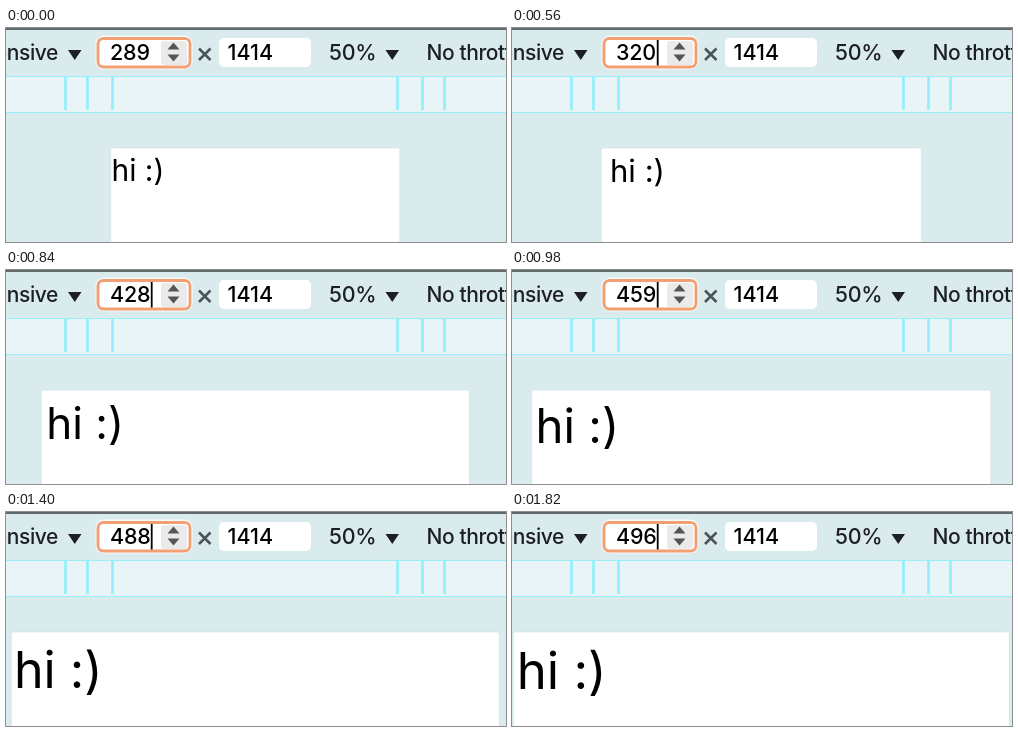
Recreate the animation shown at these times as an HTML page. Size 500 by 214 pixels, loop 1960 ms.

```html
<!DOCTYPE html>
<html lang="en">
<head>
<meta charset="utf-8">
<title>Responsive width</title>
<style>
  html, body { margin: 0; width: 100%; height: 100%; overflow: hidden; background: #daebee; }
  svg { display: block; width: 100vw; height: 100vh; }
  text { font-family: Inter, Roboto, sans-serif; white-space: pre; }
  .ui { font-size: 21.5px; font-weight: 500; fill: #1d2022; }
  .word { font-size: 21px; letter-spacing: -.4px; }
  .number { fill: #000; }
  .field { fill: #fff; }
</style>
</head>
<body>
<svg viewBox="0 0 500 214">
  <rect width="500" height="214" fill="#daebee"/>
  <rect width="500" height="2" fill="#62696c"/>
  <rect y="48" width="500" height="37" fill="#e9f4f7"/>
  <path d="M0 48.5H500M0 84.5H500" stroke="#98effb"/>
  <path id="ticks" stroke="#92effc" stroke-width="2.7"/>

  <g class="ui">
    <text class="word" x="52" y="32" text-anchor="end">responsive</text>
    <text x="323" y="32" letter-spacing="-.3">50%</text>
    <text class="word" x="420.5" y="32">No throttling</text>
  </g>
  <path d="M62 22H75.5L68.75 32ZM379.5 22H393L386.25 32Z" fill="#1d2022"/>
  <path d="M193 20.5L204.5 32M204.5 20.5L193 32" stroke="#4b5357" stroke-width="2.5"/>

  <rect class="field" x="89.5" y="7.5" width="97" height="34" rx="8.5" opacity=".8"/>
  <rect class="field" x="92" y="10.5" width="92" height="28.5" rx="5.5" stroke="#f2a073" stroke-width="2.9"/>
  <rect x="155" y="13" width="26" height="24" rx="3" fill="#eaeaea"/>
  <path d="M161.5 21.5L167.5 14.5L173.5 21.5ZM161.5 26.5H173.5L167.5 33.5Z" fill="#555"/>
  <text id="value" class="ui number" x="104" y="32" letter-spacing="-.2"></text>
  <path id="caret" d="M145.7 12V37.5" stroke="#000" stroke-width="1.8"/>

  <rect class="field" x="213" y="10" width="92" height="29" rx="5"/>
  <text class="ui number" x="221.5" y="32">1414</text>

  <rect id="page" y="120" height="100" rx="1.5" fill="#fff" stroke="#cfdfe2" stroke-width=".6"/>
  <text id="greeting">hi :)</text>
</svg>
<script>
const $ = id => document.getElementById(id);
const LOOP = 1960, STEP = 70, START = 280, END = 1820, CENTER = 249.3;

// time, page width, left edge of the text ink, ink width of the text
const keys = [
  [280, 289, 107, 50],
  [490, 305, 100, 51],
  [560, 320, 99.5, 52],
  [700, 384, 63.5, 65.5],
  [840, 428, 42.5, 73.5],
  [1190, 484, 12.8, 83.5],
  [1540, 490, 8.8, 84],
  [1820, 496, 7.3, 85]
];

$('ticks').setAttribute('d', [59.5, 81.5, 106.5, 391.5, 416.5, 438.5].map(x => `M${x} 49V82`).join(''));

function set(id, attrs) {
  for (const k in attrs) $(id).setAttribute(k, attrs[k]);
}

function pose(t) {
  const i = Math.max(1, keys.findIndex(k => k[0] >= t));
  const a = keys[i - 1], b = keys[i];
  let p = (t - a[0]) / (b[0] - a[0]);
  if (i === 1) p *= p;
  if (a[0] === 840) p = 1 - (1 - p) ** 1.6;
  return a.map((v, n) => v + (b[n] - v) * p);
}

function draw(ms) {
  const t = Math.min(END, Math.max(START, Math.floor(ms / STEP) * STEP));
  const [, w, x, ink] = pose(t);
  const width = Math.round(w), size = ink / 1.67;
  $('value').textContent = width;
  set('caret', { visibility: t > START ? 'visible' : 'hidden' });
  set('page', { x: CENTER - width / 2, width });
  set('greeting', { x: x - size * 0.05, y: 119.3 + 1.125 * size, 'font-size': size });
}

function tick(now) {
  draw(now % LOOP);
  requestAnimationFrame(tick);
}
draw(0);
requestAnimationFrame(tick);
</script>
</body>
</html>
```
